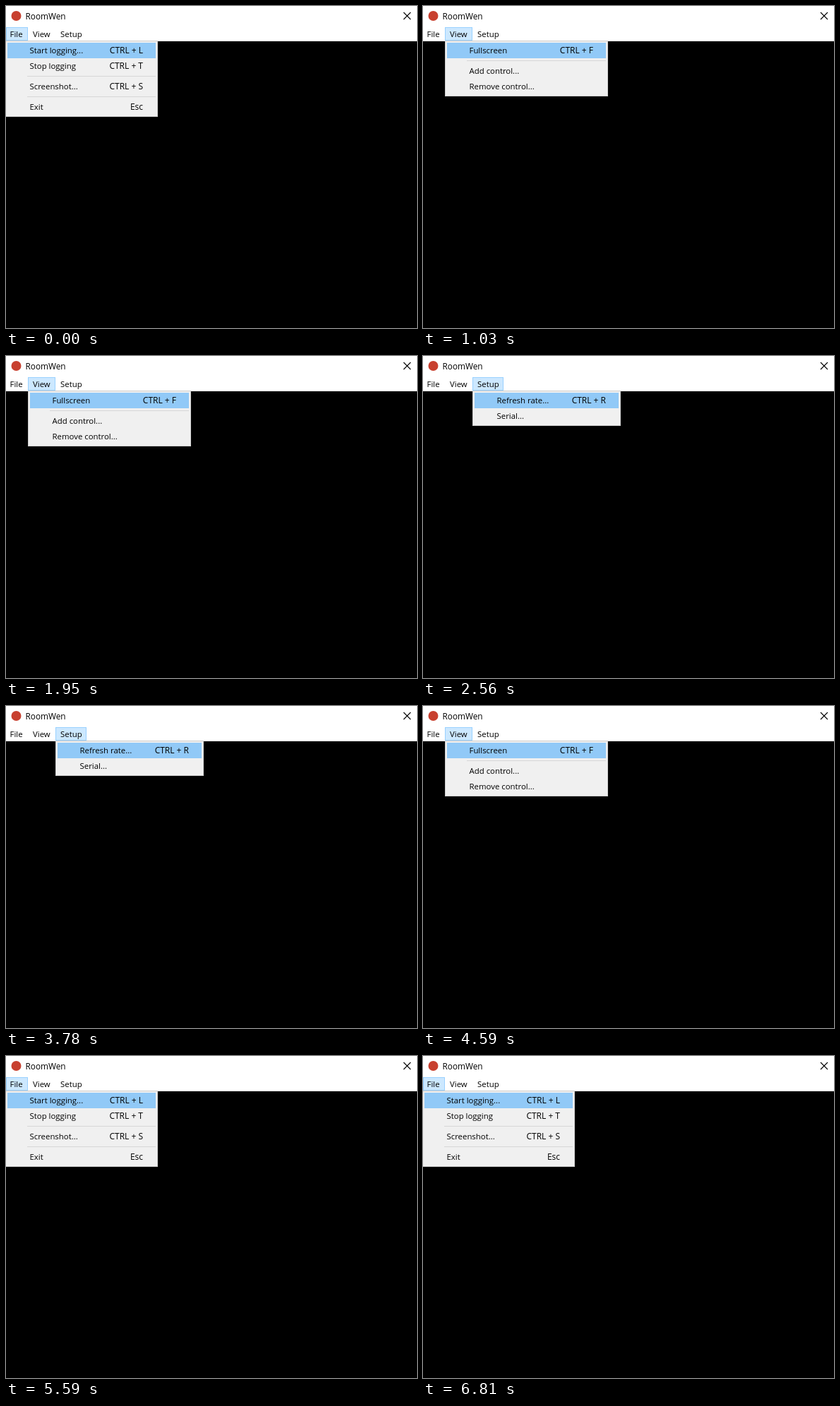
Write an HTML page with a canvas that moves like this. It is 582 px wide and 456 px high and loops after 7.62 s.

```html
<!DOCTYPE html>
<html lang="en">
<head>
<meta charset="utf-8">
<title>RoomWen</title>
<style>
html, body { margin: 0; width: 100%; height: 100%; overflow: hidden; background: #000; }
canvas { display: block; }
</style>
</head>
<body>
<canvas id="stage" width="582" height="456"></canvas>
<script>
const ctx = document.getElementById("stage").getContext("2d");
const FONT = '"Open Sans", "Noto Sans", sans-serif';
const LOOP = 7620, TOP = 49, ROW = 22, GAP = 7;

// A null item is a separator.
const menus = [
  { name: "File", x: -1, tab: 32, textX: 5.5, right: 215, items: [
    ["Start logging...", "CTRL + L"], ["Stop logging", "CTRL + T"], null,
    ["Screenshot...", "CTRL + S"], null, ["Exit", "Esc"]] },
  { name: "View", x: 31, tab: 39, textX: 38, right: 262, items: [
    ["Fullscreen", "CTRL + F"], null, ["Add control..."], ["Remove control..."]] },
  { name: "Setup", x: 70, tab: 44, textX: 77, right: 280, items: [
    ["Refresh rate...", "CTRL + R"], ["Serial..."]] }
];

// [end time, open menu]
const steps = [[1030, 0], [2560, 1], [4590, 2], [5590, 1], [LOOP, 0]];

function rect(x, y, w, h, color) {
  ctx.fillStyle = color;
  ctx.fillRect(x, y, w, h);
}

function box(x, y, w, h, fill, edge) {
  rect(x, y, w, h, edge);
  rect(x + 1, y + 1, w - 2, h - 2, fill);
}

function text(str, x, y, size = 11.4, align = "left") {
  ctx.font = `${size}px ${FONT}`;
  ctx.textAlign = align;
  ctx.fillStyle = "#000";
  ctx.fillText(str, x, y);
}

function drawWindow() {
  rect(0, 0, 582, 456, "#000");
  rect(0, 0, 582, 50, "#fff");
  rect(0, 49, 582, 1, "#f0f0f0");
  ctx.fillStyle = "#c8402f";
  ctx.beginPath();
  ctx.arc(14.5, 14, 7, 0, Math.PI * 2);
  ctx.fill();
  text("RoomWen", 27.5, 19, 11.8);
  ctx.strokeStyle = "#000";
  ctx.lineWidth = 1.1;
  ctx.beginPath();
  ctx.moveTo(563, 9);
  ctx.lineTo(573, 19);
  ctx.moveTo(573, 9);
  ctx.lineTo(563, 19);
  ctx.stroke();
}

function drawPopup({ x, right, items }) {
  const height = items.reduce((h, item) => h + (item ? ROW : GAP), 6);
  box(x, TOP, right - x, height, "#f0f0f0", "#cccccc");
  let y = TOP + 3;
  items.forEach((item, i) => {
    if (!item) {
      rect(x + 31, y + 3, right - x - 34, 1, "#d7d7d7");
      y += GAP;
      return;
    }
    if (i === 0) rect(x + 3, y, right - x - 6, ROW, "#91c9f7");
    text(item[0], x + 34.5, y + 15);
    if (item[1]) text(item[1], right - 21, y + 15, 12, "right");
    y += ROW;
  });
}

function draw(open) {
  drawWindow();
  menus.forEach((menu, i) => {
    if (i === open) {
      const left = Math.max(0, menu.x);
      box(left, 30, menu.x + menu.tab - left, 19, "#cce8ff", "#99d1ff");
    }
    text(menu.name, menu.textX, 44);
  });
  drawPopup(menus[open]);
}

const start = performance.now();
function tick(now) {
  const t = Math.max(0, now - start) % LOOP;
  draw(steps.find(([end]) => t < end)[1]);
  requestAnimationFrame(tick);
}
tick(start);
</script>
</body>
</html>
```
